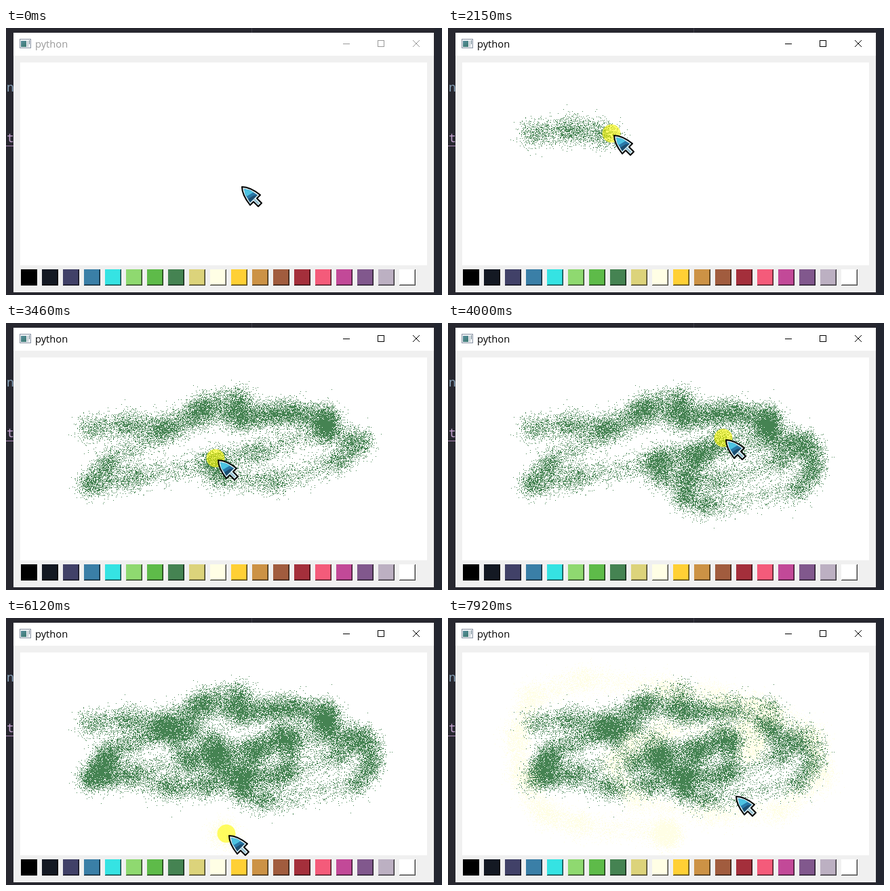
An HTML page with a canvas that plays this animation: 643x395 px, repeating every 8 s.

```html
<!DOCTYPE html>
<html lang="en">
<head>
<meta charset="utf-8">
<title>Spray paint</title>
<style>
html, body { margin: 0; width: 100%; height: 100%; overflow: hidden; background: #27272f; }
canvas { display: block; }
</style>
</head>
<body>
<canvas id="stage" width="643" height="395"></canvas>
<script>
const LOOP = 8000;
const REFRESH = 78.6, FIRST_REFRESH = 70;
const ACTIVE_AT = 690;
const DAB_EVERY = 5.5, DAB_DOTS = 100, DAB_SPREAD = 10;
const PAD = { x: 21, y: 51, w: 600, h: 300 };
const GREEN = '#458352', CREAM = '#fffee5';
const COLORS = ['#000000', '#141923', '#414168', '#3a7fa7', '#35e3e3', '#8fd970', '#5ebb49',
  GREEN, '#dcd37b', CREAM, '#ffd035', '#cc9245', '#a15c3e', '#a42f3b', '#f45b7a', '#c24998',
  '#81588d', '#bcb0c2', '#ffffff'];

const mix = (a, b, k) => a + (b - a) * k;
const smooth = k => k * k * (3 - 2 * k);

// The pointer lingers at each stop; every leg starts where the last one ended.
const legs = [];
let at = [344, 232];

function addLeg(from, to, stops, extra) {
  const leg = { from, to, stops: [at, ...stops], ...extra };
  at = stops[stops.length - 1];
  legs.push(leg);
}
const move = (from, to, ...stops) => addLeg(from, to, stops);
const press = (from, to) => addLeg(from, to, [at], { down: true });
const stroke = (ink, from, to, ...stops) => addLeg(from, to, stops, { ink, down: true });

move(70, 660, [311, 272], [254, 276], [247, 366]);
press(690, 800);
move(840, 1070, [245, 228]);
move(1110, 1300, [149, 154]);
move(1400, 1610, [120, 156]);
stroke(GREEN, 1980, 2895, [180, 150], [232, 158], [330, 133], [378, 135], [425, 133], [473, 142],
  [468, 158], [370, 190], [300, 208], [190, 228], [122, 240], [150, 208], [232, 158], [278, 132], [296, 123]);
stroke(GREEN, 2895, 3995, [345, 112], [343, 145], [405, 134], [473, 140], [472, 160], [525, 175],
  [490, 203], [395, 235], [314, 228], [308, 200], [370, 195], [480, 178], [535, 185], [538, 215],
  [518, 245], [385, 271], [347, 258], [352, 228], [368, 200], [406, 170]);
stroke(GREEN, 3995, 5035, [420, 182], [415, 230], [345, 240], [315, 205], [305, 180], [270, 215],
  [235, 165], [275, 165], [225, 165], [150, 200], [130, 233], [152, 230], [240, 250], [292, 246], [345, 240]);
move(5040, 5175, [274, 330]);
move(5200, 5480, [307, 366]);
press(5500, 5620);
move(5660, 6020, [318, 317]);
stroke(CREAM, 6040, 6825, [325, 319], [321, 318], [195, 306], [140, 288], [108, 235], [101, 175],
  [122, 116], [200, 90], [320, 104], [397, 117]);
stroke(CREAM, 6825, 7640, [448, 130], [478, 140], [540, 175], [553, 235], [490, 285], [390, 290],
  [275, 270], [243, 215], [275, 185], [320, 165], [440, 158], [455, 185], [441, 203]);
press(7640, 7840);
move(7850, 7920, [421, 261]);

function alongLeg({ from, to, stops }, t) {
  const last = stops.length - 1;
  const pos = Math.min(1, (t - from) / (to - from)) * last;
  const i = Math.min(last - 1, Math.floor(pos));
  const k = smooth(pos - i);
  return stops[i].map((v, axis) => mix(v, stops[i + 1][axis], k));
}

const pointerAt = t => alongLeg(legs.findLast(leg => leg.from <= t) || { ...legs[0], from: t }, t);
const isDown = t => legs.some(leg => leg.down && t >= leg.from && t <= leg.to);

const dabs = [];
for (const leg of legs.filter(leg => leg.ink)) {
  for (let t = leg.from; t < leg.to; t += DAB_EVERY) dabs.push({ t, spot: alongLeg(leg, t), color: leg.ink });
}

const ctx = document.getElementById('stage').getContext('2d');
const paper = document.createElement('canvas');
paper.width = PAD.w;
paper.height = PAD.h;
const ink = paper.getContext('2d');

function seeded(seed) {
  return () => {
    seed = (seed + 0x6d2b79f5) | 0;
    let v = Math.imul(seed ^ (seed >>> 15), 1 | seed);
    v = (v + Math.imul(v ^ (v >>> 7), 61 | v)) ^ v;
    return ((v ^ (v >>> 14)) >>> 0) / 4294967296;
  };
}

function spray({ spot, color }, seed) {
  const rand = seeded(seed * 7919 + 17);
  ink.fillStyle = color;
  for (let i = 0; i < DAB_DOTS; i++) {
    const r = DAB_SPREAD * Math.sqrt(-2 * Math.log(1 - rand()));
    const a = rand() * Math.PI * 2;
    ink.fillRect(Math.round(spot[0] - PAD.x + r * Math.cos(a)),
      Math.round(spot[1] - PAD.y + r * Math.sin(a)), 1, 1);
  }
}

let sprayed = 0;
function paintUntil(t) {
  if (sprayed && dabs[sprayed - 1].t > t) sprayed = 0;
  if (!sprayed) ink.clearRect(0, 0, PAD.w, PAD.h);
  while (sprayed < dabs.length && dabs[sprayed].t <= t) spray(dabs[sprayed], sprayed++);
}

function lastRefresh(t) {
  const n = Math.floor((t - FIRST_REFRESH) / REFRESH + 0.3);
  return n < 0 ? 0 : FIRST_REFRESH + n * REFRESH;
}

function rect(color, x, y, w, h) {
  ctx.fillStyle = color;
  ctx.fillRect(x, y, w, h);
}

function shape(color, ...points) {
  ctx.beginPath();
  points.forEach(([x, y]) => ctx.lineTo(x, y));
  ctx.closePath();
  ctx.fillStyle = color;
  ctx.fill();
}

function text(string, x, y, color, font) {
  ctx.font = font;
  ctx.fillStyle = color;
  ctx.fillText(string, x, y);
}

function drawDesk() {
  const mono = '18px "Noto Sans Mono", "DejaVu Sans Mono", monospace';
  rect('#27272f', 0, 0, 643, 395);
  rect('#232630', 632, 0, 11, 395);
  rect('#3d3e48', 362, 0, 1, 7);
  text('n', 1, 94, '#8ba6bd', mono);
  text('t', 1, 169, '#c3a3cf', mono);
  rect('#b08abb', 0, 174, 11, 1);
}

function drawIcon() {
  rect('#8b95a5', 20, 16, 17, 14);
  rect('#eef1f4', 21, 17, 15, 12);
  const g = ctx.createLinearGradient(22, 18, 30, 28);
  g.addColorStop(0, '#5a8fa0');
  g.addColorStop(1, '#3c7a70');
  rect(g, 22, 19, 8, 9);
  rect('#c9d0d6', 31, 19, 2, 9);
  rect('#6f8791', 34, 18, 1, 6);
}

function drawWindow(active) {
  const tone = active ? '#000000' : '#999999';
  rect('#f0f0f0', 11, 7, 620, 384);
  rect('#ffffff', 11, 7, 620, 34);
  drawIcon();
  text('python', 43, 29, tone, '14.7px "Open Sans", "Noto Sans", sans-serif');
  rect(tone, 497, 23, 10, 1);
  ctx.strokeStyle = tone;
  ctx.lineWidth = 1;
  ctx.strokeRect(548.5, 18.5, 9, 9);
  ctx.beginPath();
  ctx.moveTo(600, 18);
  ctx.lineTo(610, 28);
  ctx.moveTo(610, 18);
  ctx.lineTo(600, 28);
  ctx.stroke();
  rect('#ffffff', PAD.x, PAD.y, PAD.w, PAD.h);
}

function drawSwatch(color, i) {
  const x = 22 + 31 * i, y = 357;
  const edge = (shade, inset) => {
    rect(shade, x + inset, y + 23 - inset, 24 - 2 * inset, 1);
    rect(shade, x + 23 - inset, y + inset, 1, 23 - 2 * inset);
  };
  rect(color, x, y, 24, 24);
  edge('rgba(0,0,0,.32)', 1);
  edge('rgba(0,0,0,.75)', 0);
}

function drawPointer([x, y], down) {
  x = Math.round(x);
  y = Math.round(y);
  if (down) {
    ctx.beginPath();
    ctx.arc(x, y, 13.5, 0, Math.PI * 2);
    ctx.fillStyle = 'rgba(255,250,0,.6)';
    ctx.fill();
  }
  ctx.save();
  ctx.translate(x + 3, y + 2);
  ctx.beginPath();
  ctx.moveTo(1, 1);
  ctx.quadraticCurveTo(13, 1, 28, 13);
  ctx.lineTo(23, 18);
  ctx.lineTo(30, 25);
  ctx.lineTo(25, 30);
  ctx.lineTo(18, 23);
  ctx.lineTo(13, 28);
  ctx.quadraticCurveTo(1, 13, 1, 1);
  ctx.closePath();
  ctx.fillStyle = '#d9edf2';
  ctx.fill();
  ctx.strokeStyle = '#000000';
  ctx.lineWidth = 2;
  ctx.lineJoin = 'round';
  ctx.stroke();
  shape('#2878a8', [4, 4], [13, 6], [24, 13], [19, 18], [13, 24], [6, 13]);
  shape('#4cc3e2', [4, 4], [13, 6], [18, 9], [8, 15], [6, 13]);
  shape('#1d4e70', [24, 13], [19, 18], [13, 24], [10, 19], [18, 14]);
  shape('#8db9cc', [20, 19], [26, 25], [25, 27], [18, 20]);
  ctx.restore();
}

function draw(time) {
  const t = lastRefresh(time % LOOP);
  paintUntil(t);
  drawDesk();
  drawWindow(t >= ACTIVE_AT);
  ctx.drawImage(paper, PAD.x, PAD.y);
  COLORS.forEach(drawSwatch);
  drawPointer(pointerAt(t), isDown(t));
}

const began = performance.now();
function tick() {
  draw(performance.now() - began);
  requestAnimationFrame(tick);
}
tick();
</script>
</body>
</html>
```
